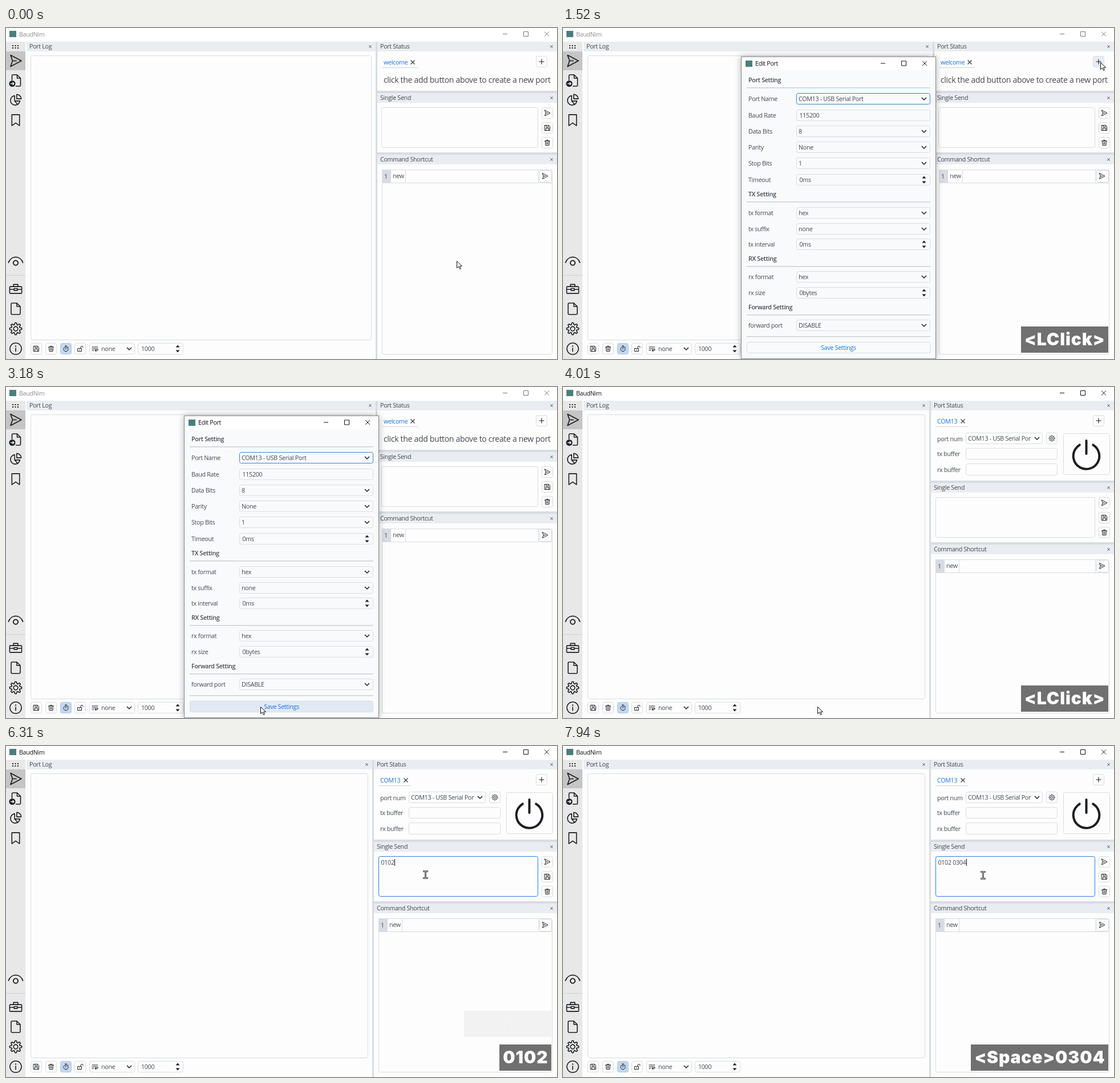
These frames come from a looping animation (966 px wide and 580 px high, 8 s). An HTML page with a canvas:

```html
<!DOCTYPE html>
<html lang="en">
<head>
<meta charset="utf-8">
<title>Serial terminal</title>
<style>
html, body { margin: 0; width: 100%; height: 100%; overflow: hidden; background: #fff; }
canvas { display: block; width: 966px; height: 580px; }
</style>
</head>
<body>
<canvas id="stage" width="966" height="580"></canvas>
<script>
const LOOP = 8000;
const ctx = document.getElementById('stage').getContext('2d');
const INK = '#43484f', DARK = '#1b1d20', LINE = '#d8dbe0', BLUE = '#1a73d9', BAR = '#e9edf1', SPLIT = '#d8dce2';
const UI = '"Open Sans", "Noto Sans", sans-serif';

const ICON = {
  send: 'M3 2L22 12L3 22L6.5 12ZM6.5 12H13',
  save: 'M3 3H17L21 7V21H3ZM8 3V9H16V3M7 21V13H17V21',
  trash: 'M3 6H21M9 6V3H15V6M5 6L6 21H18L19 6M10 10V17M14 10V17',
  timer: 'M9 2H15M12 5.5A8 8 0 1 0 12.01 5.5M12 14V9M18.5 5.5L20.5 7.5',
  lock: 'M4 11H17V21H4ZM14 11V7A4 4 0 0 1 22 7V8M10.5 15V17',
  wrap: 'M2 6H22M2 12H19A3 3 0 0 1 19 18H13M15.5 15.5L13 18L15.5 20.5M2 18H8',
  importFile: 'M7 11V4Q7 2 9 2H16L22 8V20Q22 22 20 22H14M16 2V8H22',
  pie: 'M10 4A9 9 0 1 0 20 14H10ZM14 1.5A8.5 8.5 0 0 1 22.5 10H14ZM10 14L16 21',
  bookmark: 'M5 2H19V22L12 17L5 22Z',
  eye: 'M0 13.5C4 1.2 20 1.2 24 13.5M12 10A4 4 0 1 0 12.01 10',
  tools: 'M2.5 8H21.5Q23 8 23 9.5V19Q23 20.5 21.5 20.5H2.5Q1 20.5 1 19V9.5Q1 8 2.5 8ZM8 8V4H16V8M1 13H9M15 13H23M9 11.5H15V15H9Z',
  file: 'M4 4Q4 2 6 2H14L20 8V20Q20 22 18 22H6Q4 22 4 20ZM14 2V8H20',
  info: 'M12 1.5A10.5 10.5 0 1 0 12.01 1.5M12 11V17M12 6.5V8',
  gear: gearPath()
};
for (const k in ICON) ICON[k] = new Path2D(ICON[k]);

function gearPath() {
  let d = '';
  for (let i = 0; i < 96; i++) {
    const a = i / 96 * Math.PI * 2;
    const r = 9.4 + 1.7 * Math.tanh(2.5 * Math.cos(a * 8));
    d += (i ? 'L' : 'M') + (12 + r * Math.cos(a)).toFixed(2) + ' ' + (12 + r * Math.sin(a)).toFixed(2);
  }
  return d + 'ZM16 12A4 4 0 1 0 16 12.01';
}

const clamp = v => Math.max(0, Math.min(1, v));
const ramp = (t, a, b) => clamp((t - a) / (b - a));
const smooth = p => p * p * (3 - 2 * p);
const inside = (p, x, y, w, h) => p.x >= x && p.x < x + w && p.y >= y && p.y < y + h;

function fill(x, y, w, h, color) {
  ctx.fillStyle = color;
  ctx.fillRect(x, y, w, h);
}
function box(x, y, w, h, bg = '#fdfdfd', border = LINE, r = 3) {
  ctx.beginPath();
  ctx.roundRect(x + .5, y + .5, w - 1, h - 1, r);
  ctx.fillStyle = bg;
  ctx.fill();
  ctx.strokeStyle = border;
  ctx.lineWidth = 1;
  ctx.stroke();
}
function stroke(d, color = DARK, width = 1) {
  ctx.strokeStyle = color;
  ctx.lineWidth = width;
  ctx.stroke(new Path2D(d));
}
function icon(name, cx, cy, size, width = 1, color = DARK) {
  const s = size / 24;
  ctx.save();
  ctx.translate(cx - size / 2, cy - size / 2);
  ctx.scale(s, s);
  ctx.lineJoin = ctx.lineCap = 'round';
  ctx.lineWidth = width / s;
  ctx.strokeStyle = color;
  ctx.stroke(ICON[name]);
  ctx.restore();
}
function text(s, x, y, color = INK, size = 10.7, weight = 400, align = 'left') {
  ctx.font = `${weight} ${size}px ${UI}`;
  ctx.letterSpacing = '-0.3px';
  ctx.textAlign = align;
  ctx.fillStyle = color;
  ctx.fillText(s, x, y);
  const w = ctx.measureText(s).width;
  ctx.letterSpacing = '0px';
  return w;
}
const cross = (x, y, r, color, w) =>
  stroke(`M${x - r} ${y - r}L${x + r} ${y + r}M${x + r} ${y - r}L${x - r} ${y + r}`, color, w);
const chevron = (x, y) => stroke(`M${x - 4} ${y - 2}L${x} ${y + 2}L${x + 4} ${y - 2}`, DARK, 1.5);
function spinner(x, y) {
  ctx.fillStyle = DARK;
  ctx.fill(new Path2D(`M${x - 3.5} ${y - 2.5}h7l-3.5 -4zM${x - 3.5} ${y + 2.5}h7l-3.5 4z`));
}
function toolButton(name, x, y, bg, border) {
  box(x, y, 20, 20, bg, border);
  icon(name, x + 10, y + 10, 12);
}
function dockTitle(s, x, y, right) {
  fill(x, y, right - x, 17, BAR);
  text(s, x + 5, y + 12);
  cross(right - 9.5, y + 8.5, 2, '#33373c', 1);
}
function windowButtons(x, y, gap, r, color) {
  stroke(`M${x - r} ${y}h${2 * r}M${x + gap - r} ${y - r}h${2 * r}v${2 * r}h${-2 * r}z`, color);
  cross(x + 2 * gap, y, r, color, 1);
}

function titleBar(active) {
  fill(0, 0, 966, 24, '#fff');
  fill(6, 5, 12, 11, '#4b7f7c');
  text('BaudNim', 23, 15, active ? '#111' : '#8d8d8d');
  windowButtons(875, 10.5, 36.5, 4, active ? '#111' : '#777');
}

function sidebar() {
  fill(0, 24, 34, 556, '#e8e8e8');
  fill(0, 41, 34, 33, '#c5c5c5');
  for (let i = 0; i < 6; i++) fill(11 + i % 3 * 4.5, 30 + (i > 2) * 4, 2, 2, DARK);
  icon('send', 17, 57.5, 24, 1.7);
  icon('importFile', 15.5, 92, 24, 1.6);
  ctx.beginPath();
  ctx.arc(11, 97.5, 5.5, 0, 7);
  ctx.fillStyle = DARK;
  ctx.fill();
  stroke('M8 97.5H13.5M11.5 95L14 97.5L11.5 100', '#fff', 1.3);
  icon('pie', 17, 126, 22, 1.6);
  icon('bookmark', 17, 161.5, 23, 1.6);
  icon('eye', 17, 409.5, 25, 1.8);
  fill(0, 433, 34, 1, '#cfcfcf');
  icon('tools', 17, 457, 23, 1.6);
  icon('file', 17, 492, 24, 1.6);
  icon('gear', 17, 527, 23, 1.6);
  icon('info', 17, 562, 23, 1.6);
}

function logPanel(right) {
  dockTitle('Port Log', 36, 24, right - 1);
  box(43, 48, right - 51, 499);
  toolButton('save', 43, 552);
  toolButton('trash', 69, 552);
  toolButton('timer', 95, 552, '#c4d7f0', '#b4c9e6');
  toolButton('lock', 120, 552);
  box(146, 552, 80, 20);
  icon('wrap', 156, 562, 12, 1.2);
  text('none', 167, 566);
  chevron(216, 562);
  box(231, 552, 80, 20);
  text('1000', 237, 566);
  spinner(301, 562);
}

function sendPanels(x, y, focus, message, caretOn) {
  fill(x, y - 4, 966 - x, 4, SPLIT);
  dockTitle('Single Send', x, y, 966);
  const left = x === 645 ? 653 : 658;
  const mix = (a, b) => Math.round(a + (b - a) * focus);
  box(left, y + 25, 933 - left, 71, '#fdfdfd', `rgb(${mix(216, 42)},${mix(219, 127)},${mix(224, 224)})`);
  const w = text(message, left + 4.5, y + 40);
  if (caretOn) fill(Math.round(left + 5 + (message ? w : 0)), y + 30, 1, 12, '#111');
  toolButton('send', 939, y + 25);
  toolButton('save', 939, y + 51);
  toolButton('trash', 939, y + 77);

  const top = y + 108;
  fill(x, top - 4, 966 - x, 4, SPLIT);
  dockTitle('Command Shortcut', x, top, 966);
  const tx = x + 8, ty = top + 26;
  box(tx, ty, 958 - tx, 572 - ty);
  fill(tx, ty, 16, 24, '#d8dce2');
  text('1', tx + 4, ty + 16);
  text('new', tx + 19, ty + 15);
  fill(tx + 16, ty + 23, 942 - tx, 1, LINE);
  fill(tx + 41, ty, 1, 24, LINE);
  fill(933, ty, 1, 24, LINE);
  box(935, ty + 1, 22, 22);
  icon('send', 945, ty + 11.5, 12);
}

function statusPanel(x, hasPort, cursor) {
  dockTitle('Port Status', x, 24, 966);
  const tab = hasPort ? 'COM13' : 'welcome', cx = hasPort ? 701 : 713;
  text(tab, x + 11, 64, BLUE);
  cross(cx, 60, 3.5, '#33373c', 1.2);
  fill(x + 8, 69, cx + 9 - x - 8, 1, '#cdd1d8');
  const hot = inside(cursor, 929, 49, 20, 20);
  box(929, 49, 20, 20, hot ? '#e9edf3' : '#fdfdfd');
  stroke('M934.5 59H943.5M939 54.5V63.5', DARK, 1.1);
  if (!hasPort) {
    text('click the add button above to create a new port', 662, 96, INK, 14);
    return;
  }
  text('port num', 656, 95);
  text('tx buffer', 656, 121);
  text('rx buffer', 656, 149);
  box(706, 80, 135, 20);
  ctx.save();
  ctx.beginPath();
  ctx.rect(707, 80, 114, 20);
  ctx.clip();
  text('COM13 - USB Serial Port', 710, 94);
  ctx.restore();
  chevron(831, 90);
  box(847, 80, 20, 20);
  icon('gear', 857, 90, 11);
  box(706, 107, 161, 20);
  box(706, 134, 161, 21);
  box(877, 81, 82, 73);
  ctx.beginPath();
  ctx.arc(917.5, 121, 22.8, -1.03, Math.PI + 1.03);
  ctx.lineCap = 'round';
  ctx.strokeStyle = DARK;
  ctx.lineWidth = 4;
  ctx.stroke();
  stroke('M917.5 94V117', DARK, 4);
  ctx.lineCap = 'butt';
}

// label, y, value, control: c combo, s spinner, t plain
const FIELDS = [
  ['Port Name', 124, 'COM13 - USB Serial Port', 'c'], ['Baud Rate', 153, '115200', 't'],
  ['Data Bits', 181, '8', 'c'], ['Parity', 209, 'None', 'c'], ['Stop Bits', 237, '1', 'c'],
  ['Timeout', 266, '0ms', 's'], ['tx format', 324, 'hex', 'c'], ['tx suffix', 352, 'none', 'c'],
  ['tx interval', 379, '0ms', 's'], ['rx format', 436, 'hex', 'c'], ['rx size', 464, '0bytes', 's'],
  ['forward port', 521, 'DISABLE', 'c']
];
const SECTIONS = [['Port Setting', 91], ['TX Setting', 291], ['RX Setting', 404], ['Forward Setting', 489]];

function dialog(cursor) {
  ctx.save();
  ctx.shadowColor = 'rgba(0,0,0,.3)';
  ctx.shadowBlur = 11;
  fill(312, 50, 342, 530, '#85888c');
  ctx.restore();
  fill(313, 51, 340, 23, '#fff');
  fill(313, 74, 340, 505, '#f8fafc');
  fill(320, 57, 12, 11, '#4b7f7c');
  text('Edit Port', 337, 66, '#111');
  windowButtons(561, 62, 36.5, 4, '#111');
  for (const [s, y] of SECTIONS) {
    text(s, 325, y + 4, INK, 10.7, 600);
    fill(322, y + 13, 322, 1.5, '#cdd0d4');
  }
  FIELDS.forEach(([label, y, value, kind], i) => {
    text(label, 325, y + 4);
    box(409, y - 10, 235, 20, '#f8fafc', i ? '#dadde2' : '#3b82d6');
    text(value, kind === 'c' ? 413 : 414.5, y + 4);
    if (kind === 'c') chevron(633, y);
    if (kind === 's') spinner(633, y);
  });
  fill(322, 540, 322, 1.5, '#cdd0d4');
  box(322, 550, 322, 20, inside(cursor, 322, 550, 322, 20) ? '#e0e9f3' : '#f8fafc', '#dadde2');
  text('Save Settings', 483, 564, BLUE, 10.7, 400, 'center');
}

function keyLabel(s, top, alpha) {
  if (alpha <= 0) return;
  ctx.save();
  ctx.globalAlpha = alpha;
  ctx.font = '900 30px Inter, "Open Sans", sans-serif';
  ctx.letterSpacing = '0.9px';
  ctx.textAlign = 'right';
  const w = Math.round(ctx.measureText(s).width + 12);
  fill(956 - w, top, w, 46, '#707070');
  ctx.fillStyle = '#fff';
  ctx.fillText(s, 950.5, top + 33);
  ctx.restore();
}

function keyLabels(t, typed) {
  const LOW = 523, HIGH = 464, click = '<LClick>';
  if (t >= 1280 && t < 3000) keyLabel(click, LOW, 1 - ramp(t, 2460, 2680));
  if (t >= 3890 && t < 5820) keyLabel(click, LOW, 1);
  if (t >= 5820 && t < 6400) {
    keyLabel(click, HIGH, 1 - ramp(t, 6110, 6327));
    keyLabel(typed, LOW, 1);
  }
  if (t >= 6400) {
    keyLabel('0102', HIGH, 1 - ramp(t, 7420, 7630));
    keyLabel('<Space>' + typed.slice(5), LOW, 1);
  }
}

const KEY_TIMES = [5820, 5950, 6090, 6230, 6400, 6680, 6860, 7000, 7110];
const typedAt = t => '0102 0304'.slice(0, KEY_TIMES.filter(k => k <= t).length);

// start, end, target of each pointer move
const MOVES = [[590, 1090, 942, 60], [2140, 2940, 445, 559], [3130, 3180, 446, 560],
  [4070, 4680, 735, 225], [7935, 7940, 736, 226]];
function cursorAt(t) {
  let x = 790, y = 408;
  for (const [a, b, tx, ty] of MOVES) {
    const p = smooth(ramp(t, a, b));
    x += (tx - x) * p;
    y += (ty - y) * p;
  }
  return { x: Math.round(x), y: Math.round(y) };
}

function pointer({ x, y }, beam) {
  ctx.save();
  ctx.translate(x + .5, y + .5);
  if (beam) {
    const d = 'M-3 -6H3M0 -6V6M-3 6H3';
    ctx.lineCap = 'square';
    stroke(d, '#222', 2.6);
    stroke(d, '#ddd', .8);
  } else {
    const d = new Path2D('M0 0V12L3 9.3L5 14L7 13L5 8.7H9Z');
    ctx.fillStyle = '#fff';
    ctx.fill(d);
    ctx.strokeStyle = '#111';
    ctx.lineWidth = 1;
    ctx.stroke(d);
  }
  ctx.restore();
}

function draw(t) {
  const hasPort = t >= 3950;
  const shown = ramp(t, 1380, 1500) * (1 - ramp(t, 3900, 4000));
  const active = (t >= 1280 && t < 1400) || hasPort;
  const x = hasPort ? 645 : 651;
  const cursor = cursorAt(t);
  const typed = typedAt(t);
  const caretOn = (t >= 4820 && t < 5350) || (t >= 5820 && t < 7630) || t >= 7940;

  ctx.globalAlpha = 1;
  fill(0, 0, 966, 580, '#fdfdfd');
  titleBar(active);
  sidebar();
  logPanel(x - 2);
  fill(x - 3, 24, 3, 556, SPLIT);
  statusPanel(x, hasPort, cursor);
  sendPanels(x, hasPort ? 168 : 114, ramp(t, 4730, 4880), typed, caretOn);
  if (shown > 0) {
    ctx.globalAlpha = shown;
    dialog(cursor);
    ctx.globalAlpha = 1;
  }
  keyLabels(t, typed);
  const overText = inside(cursor, 43, 48, 591, 498) || inside(cursor, 653, 193, 280, 71);
  pointer(cursor, hasPort && overText);
}

function frame() {
  draw(performance.now() % LOOP);
  requestAnimationFrame(frame);
}
frame();
</script>
</body>
</html>
```
